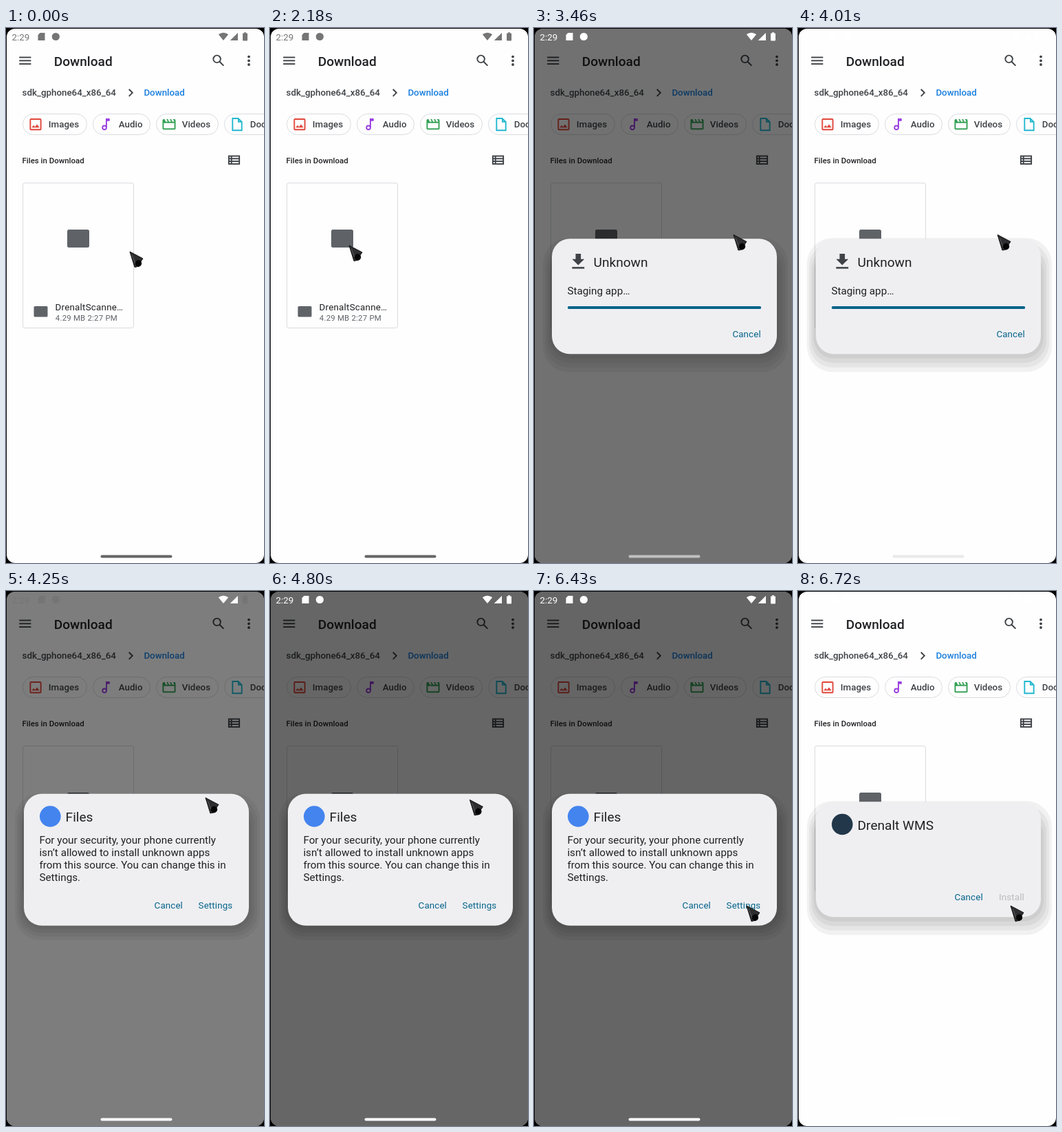
An HTML page with a canvas that plays this animation: 375x775 px, repeating every 8 s.

```html
<!DOCTYPE html>
<html lang="en">
<head>
<meta charset="utf-8">
<title>Install from Download</title>
<style>
html, body { margin: 0; width: 100%; height: 100%; overflow: hidden; background: #000; }
canvas { display: block; width: 375px; height: 775px; }
</style>
</head>
<body>
<canvas id="stage"></canvas>
<script>
const W = 375, H = 775, LOOP = 8000;
const DP = .954;                // screen pixels per layout unit
const STEP = 130, PHASE = 70;   // the screen refreshes in coarse steps

const canvas = document.getElementById('stage');
const ratio = window.devicePixelRatio || 1;
canvas.width = W * ratio;
canvas.height = H * ratio;
const c = canvas.getContext('2d');

const INK = '#202124', SOFT = '#3f4347', FAINT = '#5f6368', LINE = '#dadce0';
const TEAL = '#046489', SHEET = '#efeff2', PAPER = '#fefefe';

// Timing

const ramp = (t, a, b) => Math.min(1, Math.max(0, (t - a) / (b - a)));
const smooth = (t, a, b) => { const k = ramp(t, a, b); return k * k * (3 - 2 * k); };
const settle = (t, start, tau) => 1 - Math.exp(-Math.max(0, t - start) / tau);

const OPEN = 2300, WARN = 3970, CLOSE = 6310;

function scrim(t) {
  const level = t < WARN ? settle(t, OPEN, 450) : settle(t, WARN, 140);
  return .6 * level * (1 - ramp(t, CLOSE, CLOSE + 260));
}

function pointerAt(t) {
  let x = 180, y = 324;
  const glide = (from, to, px, py) => {
    const k = smooth(t, from, to);
    x += (px - x) * k;
    y += (py - y) * k;
  };
  glide(340, 720, 115, 315);
  glide(2160, 2280, 119, 361);
  glide(OPEN, 3060, 290, 299.5);
  glide(4680, 5530, 309, 456);
  return [x, y];
}

// Drawing helpers

function text(s, x, y, sp, color, gap = 0, weight = 400) {
  c.font = `${weight} ${sp * DP}px Roboto, sans-serif`;
  c.letterSpacing = gap + 'px';
  c.fillStyle = color;
  c.fillText(s, x, y);
}
const label = (s, x, y, color = SOFT) => text(s, x, y, 14, color, 0, 500);

function rect(x, y, w, h, color) {
  c.fillStyle = color;
  c.fillRect(x, y, w, h);
}
function pill(x, y, w, h, r, color) {
  c.beginPath();
  c.roundRect(x, y, w, h, r);
  c.fillStyle = color;
  c.fill();
}
function frame(x, y, w, h, r, color, width = 1) {
  c.beginPath();
  c.roundRect(x, y, w, h, r);
  c.strokeStyle = color;
  c.lineWidth = width;
  c.stroke();
}
function trace(points) {
  c.beginPath();
  points.forEach(([x, y]) => c.lineTo(x, y));
}
function poly(points, color) {
  trace(points);
  c.fillStyle = color;
  c.fill();
}
function line(points, color, width = 2) {
  trace(points);
  c.strokeStyle = color;
  c.lineWidth = width;
  c.stroke();
}
function disc(x, y, r, color) {
  c.beginPath();
  c.arc(x, y, r, 0, 7);
  c.fillStyle = color;
  c.fill();
}
function ring(x, y, r, color) {
  c.beginPath();
  c.arc(x, y, r, 0, 7);
  c.strokeStyle = color;
  c.lineWidth = 2;
  c.stroke();
}

// Icons live on a 24 unit grid centred on x, y.
function icon(x, y, shape, color = SOFT, scale = DP) {
  c.save();
  c.translate(x, y);
  c.scale(scale, scale);
  c.translate(-12, -12);
  shape(color);
  c.restore();
}

const icons = {
  menu(k) {
    for (let y = 6; y <= 16; y += 5) rect(3, y, 18, 2, k);
  },
  search(k) {
    ring(9.5, 9.5, 5.5, k);
    line([[13.5, 13.5], [19.7, 19.7]], k, 2.1);
  },
  more(k) {
    for (let y = 6; y <= 18; y += 6) disc(12, y, 2, k);
  },
  chevron(k) {
    line([[9.3, 6.7], [14.6, 12], [9.3, 17.3]], k);
  },
  list(k) {
    rect(3, 5, 18, 14, k);
    for (let y = 7; y <= 15; y += 4) {
      rect(5, y, 2, 2, PAPER);
      rect(9, y, 10, 2, PAPER);
    }
  },
  image(k) {
    frame(4, 4, 16, 16, 1, k, 2);
    poly([[6, 17], [9, 13.1], [11.1, 15.7], [14.1, 11.9], [18, 17]], k);
  },
  note(k) {
    ring(10, 17, 3, k);
    rect(12, 3, 2, 14, k);
    rect(12, 3, 6, 4, k);
  },
  clapper(k) {
    pill(2, 4, 20, 16, 2, k);
    rect(4, 10, 16, 8, PAPER);
    for (let x = 5; x <= 15; x += 5) poly([[x, 3.8], [x + 3, 3.8], [x + 5, 8], [x + 2, 8]], PAPER);
  },
  page(k) {
    line([[5, 3], [13.6, 3], [19, 8.4], [19, 21], [5, 21], [5, 2]], k);
    line([[14, 3], [14, 8], [19, 8]], k);
  },
  download(k) {
    rect(9, 3, 6, 7, k);
    poly([[5, 9], [19, 9], [12, 16]], k);
    rect(5, 18, 14, 2, k);
  }
};

// Screen parts

function chip(x, w, name, shape, color) {
  frame(x + .5, 124.5, w - 1, 30, 15, LINE);
  icon(x + 19, 139.6, shape, color);
  label(name, x + 37.8, 144.1);
}

function page() {
  rect(0, 0, W, H, PAPER);
  icon(27.8, 47.3, icons.menu);
  text('Download', 69.7, 54.7, 20, INK, 0, 500);
  icon(309, 47.3, icons.search);
  icon(353, 47.3, icons.more);

  label('sdk_gphone64_x86_64', 23.5, 98.4);
  icon(181.3, 93.8, icons.chevron);
  label('Download', 200.4, 98.4, '#1a7fdc');

  chip(24, 94, 'Images', icons.image, '#e0483c');
  chip(126, 84, 'Audio', icons.note, '#9a3fe0');
  chip(218, 91, 'Videos', icons.clapper, '#34a155');
  chip(317, 120, 'Documents', icons.page, '#22b8d0');

  text('Files in Download', 23.5, 195.8, 12, INK, 0, 500);
  icon(331.5, 191.2, icons.list);

  frame(24.5, 224.5, 161, 210, 2.5, LINE);
  pill(89, 292, 32, 26, 2.5, FAINT);
  pill(40.5, 403, 20, 15.5, 1.5, FAINT);
  text('DrenaltScanne…', 71.5, 408.6, 14, INK, .24);
  text('4.29 MB 2:27 PM', 71.8, 424.4, 12, FAINT, .2);
}

function bars(t) {
  const level = (from, k) => `rgb(${Array(3).fill(Math.round(from + (255 - from) * k))})`;
  const on = ramp(t, OPEN, 2820);
  const dip = Math.sin(Math.PI * ramp(t, WARN, WARN + 520));
  const left = level(117, on - dip), right = level(117, on);

  text('2:29', 8.4, 17.7, 14, left);
  poly([[49.5, 7], [56.5, 7], [56.5, 18], [46.5, 18], [46.5, 10]], left);
  disc(72.3, 12.5, 5.6, left);
  c.beginPath();
  c.moveTo(316, 18);
  c.lineTo(308.8, 9.3);
  c.quadraticCurveTo(316, 4, 323.2, 9.3);
  c.fillStyle = right;
  c.fill();
  poly([[337, 7], [337, 18], [325.8, 18]], right);
  pill(344, 7.5, 7, 11, 1, left);
  rect(346, 6.3, 3, 1.5, left);
  pill(137.5, 763.5, 104, 4, 2, level(102, ramp(t, OPEN, 4250)));
}

// Dialog with a shadow that falls off in even bands.
function sheet(y, h, drop) {
  for (let k = 1; k > 0; k -= .25) {
    const top = 26 * (1 - k) - 1;
    pill(26 - 13 * k, y + top, 327 + 29 * k, h + drop * k - top, 27 + 10 * k, 'rgba(0,0,0,.052)');
  }
  pill(26, y, 327, h, 26, SHEET);
}
const title = (s, y) => text(s, 86.6, y, 20, INK);
const body = (s, y) => text(s, 48.4, y, 16, INK);
const action = (s, x, y, color = TEAL) => text(s, x, y, 14, color, .13);

function staging() {
  sheet(305.3, 167, 26);
  icon(64.3, 338.5, icons.download, SOFT, 32 / 24 * DP);
  title('Unknown', 346);
  body('Staging app…', 385.6);
  pill(49, 403, 281, 4, 1.5, TEAL);
  action('Cancel', 288.4, 448.1);
}

function warning(press) {
  sheet(293.8, 191, 21);
  disc(64.3, 326.5, 15.3, '#4484ee');
  title('Files', 334.3);
  ['For your security, your phone currently',
    'isn’t allowed to install unknown apps',
    'from this source. You can change this in',
    'Settings.'].forEach((s, i) => body(s, 365.8 + i * 18.2));
  if (press) {
    const glow = c.createRadialGradient(306, 454, 4, 306, 454, 25);
    glow.addColorStop(0, `rgba(90,90,90,${.38 * press})`);
    glow.addColorStop(.55, `rgba(90,90,90,${.3 * press})`);
    glow.addColorStop(1, 'rgba(90,90,90,0)');
    disc(306, 454, 25, glow);
  }
  action('Cancel', 215.6, 460.1);
  action('Settings', 279.6, 460.1);
}

function confirm() {
  sheet(305.3, 167, 26);
  disc(64.3, 338, 15.3, '#22384a');
  title('Drenalt WMS', 346);
  action('Cancel', 227.4, 448.1);
  action('Install', 292, 448.1, '#b9babd');
}

function dialog(t) {
  if (t <= OPEN) return;
  c.globalAlpha = ramp(t, OPEN, 2670);
  if (t <= WARN) staging();
  else if (t <= CLOSE) warning(t < 5900 ? 0 : 1 - ramp(t, 5920, CLOSE));
  else confirm();
  c.globalAlpha = 1;
}

function pointer([x, y]) {
  c.save();
  c.translate(x, y);
  c.lineJoin = 'round';
  const arrow = [[0, 0], [19, 10], [15.5, 15], [14, 21], [7, 22.5], [0, 0]];
  poly(arrow, '#2e2e30');
  line(arrow, '#111', 1);
  line([[3, 4.5], [8, 17]], '#58585a', 1);
  disc(12.5, 17, 4.7, '#050505');
  c.restore();
}

function draw(t) {
  c.setTransform(ratio, 0, 0, ratio, 0, 0);
  rect(0, 0, W, H, '#000');
  c.save();
  c.beginPath();
  c.roundRect(1, 1, W - 1, H - 1, 12);
  c.clip();
  page();
  rect(0, 0, W, H, `rgba(0,0,0,${scrim(t)})`);
  bars(t);
  dialog(t);
  pointer(pointerAt(t));
  c.restore();
}

const start = performance.now();
function tick() {
  const t = (performance.now() - start) % LOOP;
  draw(Math.max(0, Math.floor((t - PHASE) / STEP) * STEP + PHASE));
  requestAnimationFrame(tick);
}
tick();
</script>
</body>
</html>
```
